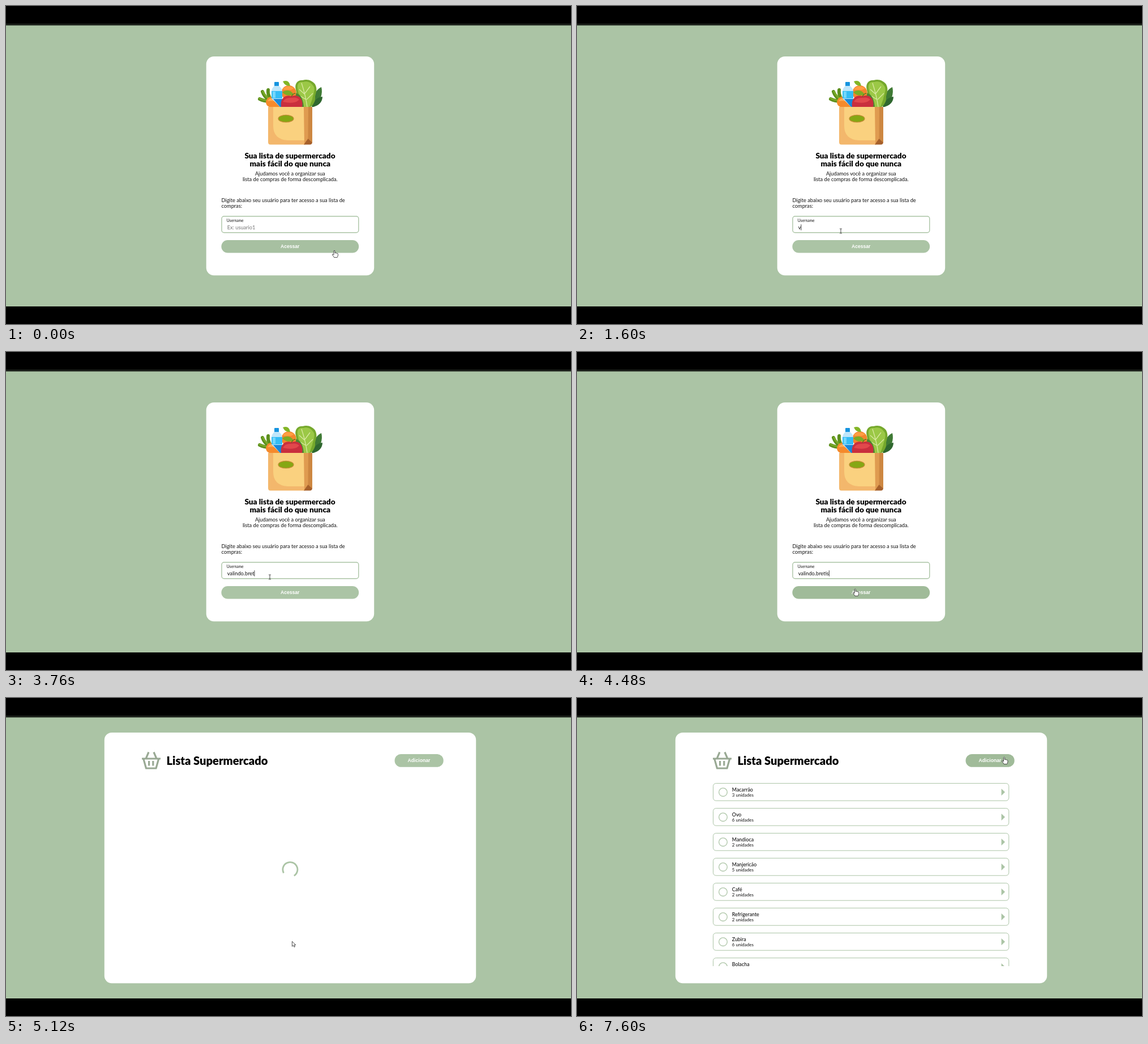
An HTML page for the animation above (8000 ms loop, 998x561 px).

```html
<!DOCTYPE html>
<html lang="pt-BR">
<head>
<meta charset="utf-8">
<title>Lista Supermercado</title>
<style>
  html, body { margin: 0; width: 100%; height: 100%; overflow: hidden; background: #000; }
  svg { display: block; width: 100vw; height: 100vh; }
  text { font: 9.23px Lato, "Open Sans", sans-serif; fill: #111; }
  .mid { text-anchor: middle; }
  .title { font-weight: 900; font-size: 13.65px; fill: #000; }
  .head { font-weight: 900; font-size: 20.1px; fill: #000; }
  .label { font-size: 6.7px; }
  .name { font-weight: 500; font-size: 8.85px; }
  .count { font-size: 8px; }
  .btn { font: bold 8.65px "Liberation Sans", Arial, sans-serif; fill: #fff; text-anchor: middle; }
  .line { fill: none; stroke: #abc4a5; }
  .cursor { fill: #fff; stroke: #222; stroke-width: .8; stroke-linejoin: round; }
</style>
</head>
<body>
<svg viewBox="0 0 998 561">
  <defs>
    <clipPath id="listArea"><rect x="230" y="140" width="545" height="333"/></clipPath>
  </defs>
  <rect width="998" height="561" fill="#000"/>
  <rect y="31" width="998" height="4" fill="#1c211b"/>
  <rect y="34.3" width="998" height="495.7" fill="#abc4a5"/>

  <g id="login">
    <rect x="353.7" y="89" width="296.5" height="386.3" rx="13.5" fill="#fff"/>

    <g id="bag">
      <!-- dark leaves -->
      <path d="M540 178C541 161 546 148 557 143C560 154 556 168 544 178Z" fill="#3f7a35"/>
      <path d="M541 178C545 165 550 161 559 160C559 169 552 177 541 178Z" fill="#2f672f"/>
      <!-- lettuce -->
      <path d="M521 178C511 165 514 158 512 148C509 137 515 130 524 131C533 128 541 132 546 138C551 148 547 153 546 160C547 168 543 174 538 178Z" fill="#75a82c"/>
      <path d="M526 178C518 164 517 154 515 145C514 136 519 133 525 134C534 131 541 137 544 143C546 151 542 157 541 164L536 178Z" fill="#9bc846"/>
      <path d="M522 136C526 148 530 163 532 178M528 156L518 147M530 165L520 159M528 154L537 142M531 165L542 154" fill="none" stroke="#d9e9a0" stroke-width="1.3"/>
      <path d="M509 153Q524 154 526 178H517Z" fill="#4b8430"/>
      <!-- orange -->
      <circle cx="499.5" cy="153" r="13" fill="#f5852d"/>
      <path d="M488 147Q497 137 509 145Q501 151 488 147Z" fill="#ff9e43"/>
      <path d="M489 133Q500 129 502 141Q493 142 489 133Z" fill="#83b526"/>
      <!-- carrot -->
      <g fill="none" stroke-linecap="round">
        <path d="M466 168Q456 168 448 164M465 166Q456 160 453 151M467 164Q462 156 463 148" stroke="#5c8f1d" stroke-width="6"/>
        <path d="M466 167Q456 167 448 163M466 165Q458 159 454 151" stroke="#79aa28" stroke-width="3"/>
      </g>
      <path d="M459 170C460 160 469 157 478 163L489 178H465Q459 175 459 170Z" fill="#f58a2c"/>
      <path d="M462 168Q466 161 474 163L478 169Q470 166 462 168Z" fill="#ffad55"/>
      <!-- bottle -->
      <rect x="474" y="134" width="8" height="7.5" rx="1" fill="#1594df"/>
      <path d="M474 141H482Q488 145 488 152V178H484L469 163V152Q469 145 474 141Z" fill="#bfe6fa"/>
      <path d="M469 150H488V163H469Z" fill="#35bdf5"/>
      <path d="M472 164H488V178H484Z" fill="#1787d8"/>
      <path d="M471 151H476V162H471Z" fill="#74d6fb"/>
      <!-- tomato -->
      <path d="M486 178C484 164 492 156 504 159C517 155 526 164 523 178Z" fill="#c92f3d"/>
      <path d="M489 169Q493 161 504 162Q513 160 518 165Q510 174 489 169Z" fill="#e1484c"/>
      <path d="M488 152Q500 144 508 156Q496 161 488 152Z" fill="#7cac25"/>
      <path d="M504 160Q506 155 511 154" fill="none" stroke="#557b20" stroke-width="1.3"/>
      <!-- paper bag -->
      <path d="M463 178H527V244.5H467Q463 244.5 463 240Z" fill="#f3b76c"/>
      <path d="M472 178H527V237H497Q472 235 472 211Z" fill="#fad17f"/>
      <path d="M526 178H541V241L527 244.5Z" fill="#df9b50"/>
      <path d="M534 178H541V241L533.5 234Z" fill="#cd8741"/>
      <path d="M526 244.5L533.5 234L541 241Q540 244.5 537 244.5Z" fill="#a6602b"/>
      <ellipse cx="494.5" cy="198.7" rx="13.5" ry="6.3" fill="#86a713" stroke="#c18d35" stroke-width="1.2"/>
    </g>

    <text class="title mid" x="501.5" y="268.8">Sua lista de supermercado</text>
    <text class="title mid" x="501.8" y="282.8">mais fácil do que nunca</text>
    <text class="mid" x="501.8" y="299.1">Ajudamos você a organizar sua</text>
    <text class="mid" x="501.8" y="309.2">lista de compras de forma descomplicada.</text>
    <text x="380.5" y="346.2">Digite abaixo seu usuário para ter acesso a sua lista de</text>
    <text x="380.5" y="356.4">compras:</text>
    <rect class="line" x="381" y="371" width="241.8" height="28.8" rx="4" stroke-width="1.4"/>
    <text class="label" x="389.8" y="381.2">Username</text>
    <text id="field" x="390.7" y="393.6"></text>
    <rect id="caret" y="385.3" width=".8" height="10.4" fill="#111"/>
    <rect id="enter" x="380.4" y="413" width="242.8" height="22.6" rx="11.3"/>
    <text class="btn" x="501.7" y="427.2">Acessar</text>
  </g>

  <g id="home">
    <rect x="173.8" y="61" width="656.4" height="442.2" rx="13" fill="#fff"/>
    <g fill="none" stroke="#99a994" stroke-width="3.2">
      <path d="M240 107H273M243 108L247.5 124H265L269.5 108M247.5 106L252 95.5M265.5 106L261 95.5M252.6 111V119.5M259.8 111V119.5" stroke-linejoin="round"/>
    </g>
    <text class="head" x="283.5" y="117.6">Lista Supermercado</text>
    <rect id="add" x="686.5" y="99" width="86.2" height="22.8" rx="11.4"/>
    <text class="btn" x="729.5" y="113.2">Adicionar</text>
    <path id="spinner" class="line" stroke-width="2.8" d="M492.5 311.5A13 13 0 1 1 511.5 311.5"/>
    <g id="list" clip-path="url(#listArea)"></g>
  </g>

  <g id="cursor">
    <path id="arrow" class="cursor" d="M.4 .4V9.2L2.5 7.3L4 10.4L5.5 9.7L4.1 6.7H6.8Z"/>
    <path id="hand" class="cursor" d="M-1 1Q0-.8 1 1V4.8Q2 4 3 5Q4 4.4 4.8 5.4Q6.2 5 6.4 6.6V9Q6 11 5 12.6H-.4Q-1.5 10.5-3.4 8.2Q-4 6.4-2.4 6.8L-1 8Z"/>
    <path id="beam" d="M-2-4H-.4L0-3.6L.4-4H2M0-3.6V3.6M-2 4H-.4L0 3.6L.4 4H2" fill="none" stroke="#333" stroke-width=".9"/>
  </g>
</svg>
<script>
const LOOP = 8000, STEP = 80;
const FOCUS = 1120, BLUR = 5000, PRESS = 4880, OPEN = 5120, LOADED = 5920;
const USER = 'valindo.bretis';
const KEYS = [1520, 2240, 2320, 2400, 2480, 2560, 2720, 3200, 3360, 3520, 3600, 3760, 3840, 4000];
const ITEMS = [['Macarrão', 3], ['Ovo', 6], ['Mandioca', 2], ['Manjericão', 5],
  ['Café', 2], ['Refrigerante', 2], ['Zubira', 6], ['Bolacha', 2]];
// time, x, y of the cursor's hot spot
const PATH = [[0, 580, 431], [160, 575, 436], [400, 575, 436], [1040, 466, 397],
  [4240, 466, 397], [4640, 505, 429], [6000, 505, 429], [6160, 515, 408],
  [7040, 515, 408], [7440, 754.5, 104]];
const ENTER = [380, 413, 623, 435.6], INPUT = [381, 371, 623, 400], ADD = [686, 99, 773, 122];

const $ = id => document.getElementById(id);
const show = (id, on) => $(id).setAttribute('visibility', on ? 'inherit' : 'hidden');
const inside = ([x, y], [l, t, r, b]) => x >= l && x <= r && y >= t && y <= b;
const ease = p => p * p * (3 - 2 * p);

$('list').innerHTML = ITEMS.map(([name, count], i) => `
  <g transform="translate(0 ${i * 44})">
    <rect class="line" x="240.5" y="150.6" width="522.3" height="30.6" rx="5" stroke-width="1"/>
    <circle class="line" cx="258" cy="166.2" r="7.3" stroke-width="1.3"/>
    <text class="name" x="273.8" y="165.3">${name}</text>
    <text class="count" x="273.8" y="174.4">${count} unidades</text>
    <path d="M749.6 160L756 166.1L749.6 172.2Z" fill="#abc4a5"/>
  </g>`).join('');

function cursorAt(t) {
  const next = PATH.findIndex(k => k[0] > t);
  if (next < 0) return PATH[PATH.length - 1].slice(1);
  const a = PATH[next - 1], b = PATH[next];
  const p = ease((t - a[0]) / (b[0] - a[0]));
  return [a[1] + (b[1] - a[1]) * p, a[2] + (b[2] - a[2]) * p];
}

function drawField(t) {
  const typed = KEYS.filter(k => k <= t);
  const field = $('field');
  field.textContent = typed.length ? USER.slice(0, typed.length) : 'Ex: usuario1';
  field.style.fill = typed.length ? '#111' : '#757575';
  const since = t - (typed[typed.length - 1] || FOCUS);
  show('caret', t >= FOCUS && t < BLUR && since % 1000 < 500);
  $('caret').setAttribute('x', 390.7 + (typed.length ? field.getComputedTextLength() : 0));
}

function drawCursor(t, open) {
  const pos = cursorAt(t);
  const onEnter = !open && inside(pos, ENTER), onAdd = open && inside(pos, ADD);
  const kind = !open && inside(pos, INPUT) ? 'beam'
    : onAdd || (onEnter && t < PRESS) ? 'hand' : 'arrow';
  for (const id of ['arrow', 'hand', 'beam']) show(id, id === kind);
  $('cursor').setAttribute('transform', `translate(${pos})`);
  $('enter').setAttribute('fill', onEnter ? (t < STEP ? '#a7c0a1' : '#a0bb99') : '#abc4a5');
  $('add').setAttribute('fill', onAdd ? '#a0bb99' : '#abc4a5');
}

function render(t) {
  const open = t >= OPEN;
  show('login', !open);
  show('home', open);
  show('spinner', open && t < LOADED);
  show('list', t >= LOADED);
  $('spinner').setAttribute('transform', `rotate(${15 + (t - OPEN) * .36} 502 302.3)`);
  drawField(t);
  if (open) show('caret', false);
  drawCursor(t, open);
}

const start = performance.now();
function frame() {
  const t = (performance.now() - start) % LOOP;
  render(Math.floor(t / STEP) * STEP);
  requestAnimationFrame(frame);
}
frame();
</script>
</body>
</html>
```
